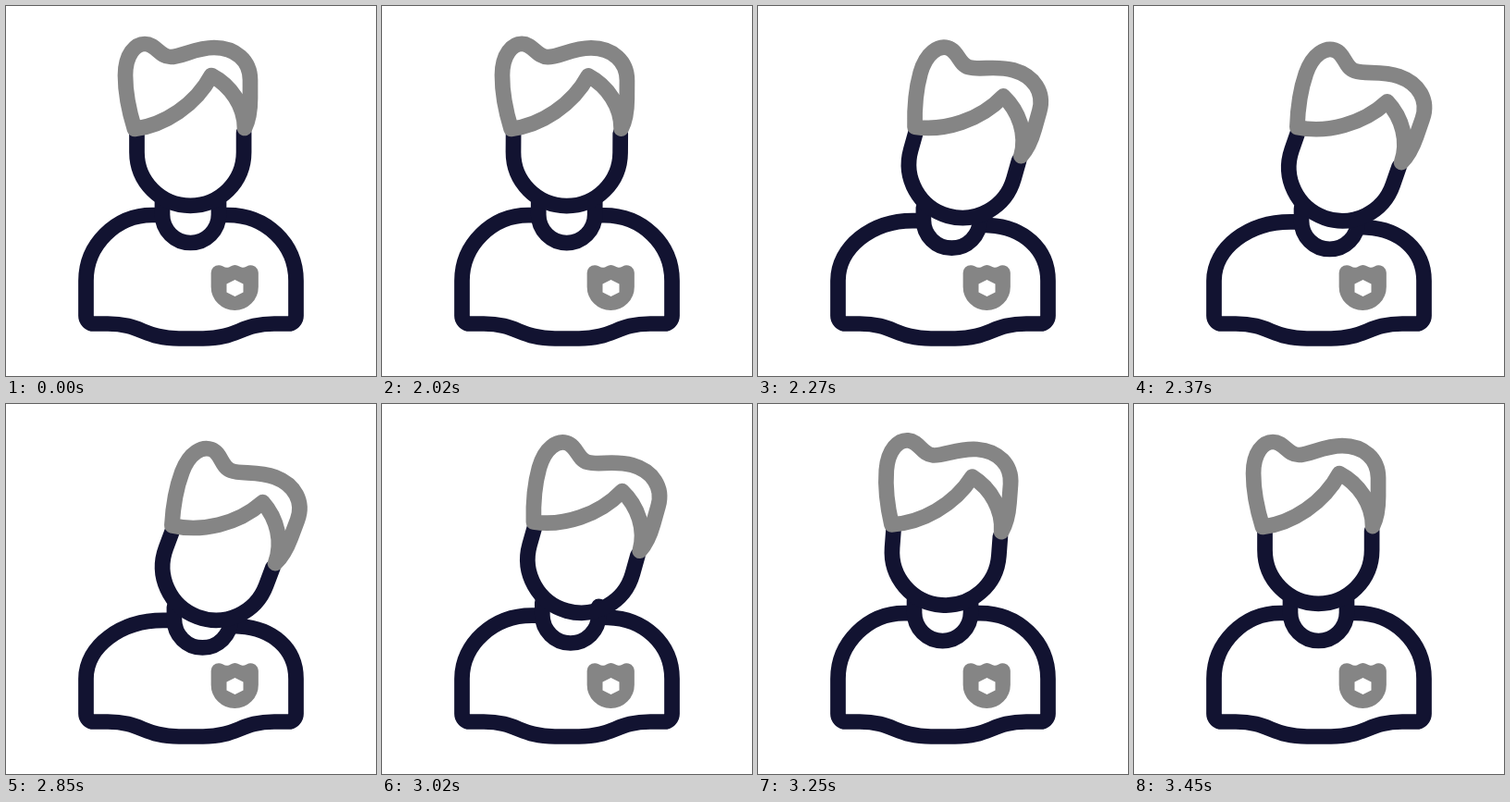
An HTML page that plays this animation: 400x400 px, repeating every 3.47 s.

```html
<!DOCTYPE html>
<html lang="en">
<head>
<meta charset="utf-8">
<title>Head tilt</title>
<style>
  html, body { margin: 0; width: 100%; height: 100%; overflow: hidden; background: #fff; }
  svg { display: block; width: 100%; height: 100%; }
  path { fill: none; stroke-width: 16.7; stroke-linecap: round; stroke-linejoin: round; }
  .navy { stroke: #121331; }
  .gray { stroke: #858585; }
</style>
</head>
<body>
<svg viewBox="0 0 400 400">
  <path id="body" class="navy"/>
  <path id="collar" class="navy"/>
  <g id="head">
    <path class="navy" d="M141.5 137V158a57.8 57.8 0 0 0 115.6 0V137"/>
    <path class="gray" d="M139 133C134 117 129 95 129 75C129 52 140 41 150 41C162 41 166 55 178 55C190 55 205 45 225 45C248 45 264 59 264 80V100C264 114 262 124 258 132C258 108 243 86 222 75C205 107 171 129 139 133Z"/>
  </g>
  <path class="gray" style="fill:#858585" d="M230 288.5Q239.5 294 247.5 288.5Q255.5 294 264.5 288.5V303.5a17.2 17.2 0 0 1-34.5 0Z"/>
  <path d="M247.5 296L256.5 300.5V309.5L247.5 314L238.5 309.5V300.5Z" style="fill:#fff"/>
</svg>
<script>
const LOOP = 3470;
const $ = id => document.getElementById(id);
const mix = (a, b, k) => a + (b - a) * k;

function bezier(x1, y1, x2, y2) {
  const at = (a, b, s) => 3 * (1 - s) ** 2 * s * a + 3 * (1 - s) * s * s * b + s ** 3;
  return x => {
    let lo = 0, hi = 1;
    for (let i = 0; i < 24; i++) {
      const s = (lo + hi) / 2;
      if (at(x1, x2, s) < x) lo = s; else hi = s;
    }
    return at(y1, y2, lo);
  };
}

const leanIn = bezier(.33, .15, .33, 1);
const turnBack = bezier(.33, 0, .55, 1);
const shiftBack = bezier(.33, 0, .2, 1);

const phase = (t, from, to, ease) =>
  t <= from ? 0 : t >= to ? 1 : ease((t - from) / (to - from));

// Upright and leaning values of the shoulder curve points
const left = [[86.5, 258, 86.5, 262], [119, 226, 124, 234], [158, 226, 170, 234], [166, 226, 179, 234]];
const right = [[233, 226, 247, 240], [240, 226, 253, 240.5], [281, 226, 288, 243], [313.5, 257, 313.5, 264]];
const place = k => ([x0, y0, x1, y1]) => mix(x0, x1, k) + ' ' + mix(y0, y1, k);

function bodyPath(k) {
  const [a, b, c, d] = left.map(place(k));
  const [e, f, g, h] = right.map(place(k));
  return `M${d}L${c}C${b} ${a} 86.5 297V335a8.5 8.5 0 0 0 8.5 8.5H110` +
    'C146 343.5 150 359.5 187 359.5H213C250 359.5 254 343.5 290 343.5' +
    `H305a8.5 8.5 0 0 0 8.5-8.5V297C${h} ${g} ${f}L${e}`;
}

// The far end of the collar shortens so that it stays behind the chin
const collarPath = k => `M169 212V225.5a30.5 30.5 0 0 0 61 0V${mix(212, 225, k)}`;

function draw(t) {
  const lean = phase(t, 2005, 2530, leanIn);
  const turn = lean - phase(t, 2835, 3470, turnBack);
  const shift = lean - phase(t, 2835, 3290, shiftBack);
  const move = `translate(${13 * shift} ${7.5 * shift})`;
  $('body').setAttribute('d', bodyPath(shift));
  $('collar').setAttribute('d', collarPath(shift));
  $('collar').setAttribute('transform', move);
  $('head').setAttribute('transform', `${move} rotate(${20.6 * turn} 178 204)`);
}

const start = performance.now();
function tick() {
  draw((performance.now() - start) % LOOP);
  requestAnimationFrame(tick);
}
tick();
</script>
</body>
</html>
```
